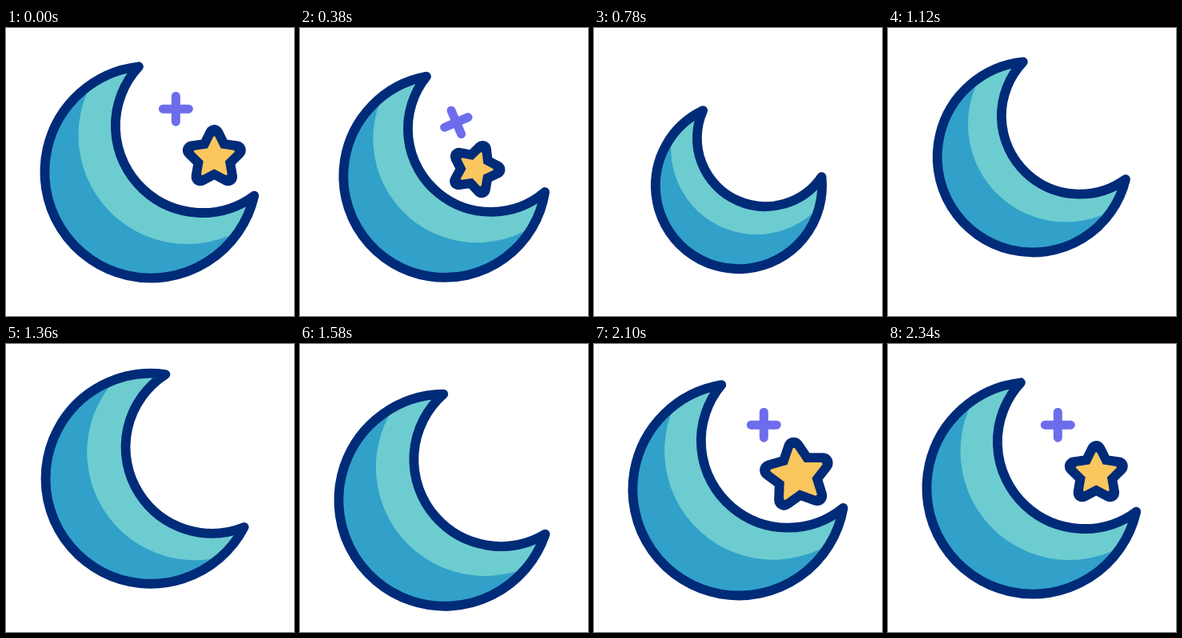
Recreate the animation shown at these times as an HTML page with a canvas. Size 360 by 360 pixels, loop 2.4 s.

```html
<!DOCTYPE html>
<html lang="en">
<head>
<meta charset="utf-8">
<title>Moon and star</title>
<style>
  html, body { margin: 0; width: 100%; height: 100%; overflow: hidden; background: #fff; }
  canvas { display: block; width: 360px; height: 360px; }
</style>
</head>
<body>
<canvas id="stage" width="360" height="360"></canvas>
<script>
const ctx = document.getElementById('stage').getContext('2d');
const LOOP = 2400;
const LINE = 11.8;
const NAVY = '#002b78', BLUE = '#31a1ca', AQUA = '#6dccd0', GOLD = '#fac75e', VIOLET = '#6d6dec';
const RAD = Math.PI / 180;

// Eased interpolation through [time, value] pairs
function track(keys, t) {
  if (t <= keys[0][0]) return keys[0][1];
  for (let i = 1; i < keys.length; i++) {
    const [t0, a] = keys[i - 1], [t1, b] = keys[i];
    if (t < t1) {
      const p = (t - t0) / (t1 - t0);
      return a + (b - a) * p * p * (3 - 2 * p);
    }
  }
  return keys[keys.length - 1][1];
}

const moonY = [[220, 180], [700, 200], [1205, 158], [1700, 201.5], [2190, 180]];
const moonScale = [[220, 1], [770, 0.785], [1440, 1]];
const moonTurn = [[220, 0], [770, -19], [1405, 15], [1800, -7], [2340, 0]];
// 0 = out in the sky, 1 = tucked behind the moon
const starHide = [[220, 0], [684, 1], [1600, 1], [2170, 0]];
const starScale = [[220, 1], [684, 0.6], [1600, 0.6], [1930, 1.33], [2320, 1]];
const plusHide = [[220, 0], [868, 1], [1580, 1], [1985, 0]];

// Crescent geometry: outer disc at the origin, inner disc cut out along the axis
const R = 132.6, r = 108.7, gap = 86.6, axis = -41.8 * RAD;
const chord = (R * R - r * r + gap * gap) / (2 * gap);
const outerHalf = Math.acos(chord / R);
const innerHalf = Math.acos((chord - gap) / r);

function drawMoon(t) {
  const s = track(moonScale, t);
  ctx.save();
  ctx.translate(181, track(moonY, t));
  ctx.rotate(track(moonTurn, t) * RAD);
  ctx.scale(s, s);

  const shape = new Path2D();
  shape.arc(0, 0, R, axis + outerHalf, axis - outerHalf + 2 * Math.PI);
  shape.arc(gap * Math.cos(axis), gap * Math.sin(axis), r, axis - innerHalf, axis + innerHalf, true);
  shape.closePath();

  ctx.fillStyle = BLUE;
  ctx.fill(shape);
  ctx.save();
  ctx.clip(shape);
  ctx.fillStyle = AQUA;
  ctx.beginPath();
  ctx.arc(45.5, -46, 136, 0, 2 * Math.PI);
  ctx.fill();
  ctx.restore();

  ctx.strokeStyle = NAVY;
  ctx.lineWidth = LINE / s;
  ctx.stroke(shape);
  ctx.restore();
}

// Five-pointed star whose corners are rounded by a stroke of its own colour
function fillStar(radius, color, width) {
  ctx.beginPath();
  for (let i = 0; i < 10; i++) {
    const d = i % 2 ? radius / 2 : radius;
    ctx.lineTo(d * Math.sin(i * 36 * RAD), -d * Math.cos(i * 36 * RAD));
  }
  ctx.closePath();
  ctx.fillStyle = ctx.strokeStyle = color;
  ctx.lineWidth = width;
  ctx.fill();
  ctx.stroke();
}

function drawStar(t) {
  const k = track(starHide, t), s = track(starScale, t);
  const size = 29.5 * s, round = 5.5 * s, tip = 1.5 * s;
  const inset = LINE / 2 - round + tip;
  ctx.save();
  ctx.translate(260.3 - 147 * k, 162 + 52 * k);
  ctx.rotate(-190 * k * RAD);
  fillStar(size, NAVY, LINE + 2 * round);
  fillStar(size - 2.26 * inset, GOLD, 2 * tip);
  ctx.restore();
}

function drawPlus(t) {
  const k = track(plusHide, t), arm = 16;
  ctx.save();
  ctx.translate(212.3 - 110 * k, 101.2 + 108 * k);
  ctx.rotate(-150 * k * RAD);
  ctx.strokeStyle = VIOLET;
  ctx.lineWidth = 11;
  ctx.beginPath();
  ctx.moveTo(-arm, 0);
  ctx.lineTo(arm, 0);
  ctx.moveTo(0, -arm);
  ctx.lineTo(0, arm);
  ctx.stroke();
  ctx.restore();
}

function draw(t) {
  ctx.fillStyle = '#fff';
  ctx.fillRect(0, 0, 360, 360);
  ctx.lineCap = ctx.lineJoin = 'round';
  drawPlus(t);
  drawStar(t);
  drawMoon(t);
}

const start = performance.now();
function tick() {
  draw((performance.now() - start) % LOOP);
  requestAnimationFrame(tick);
}
tick();
</script>
</body>
</html>
```
